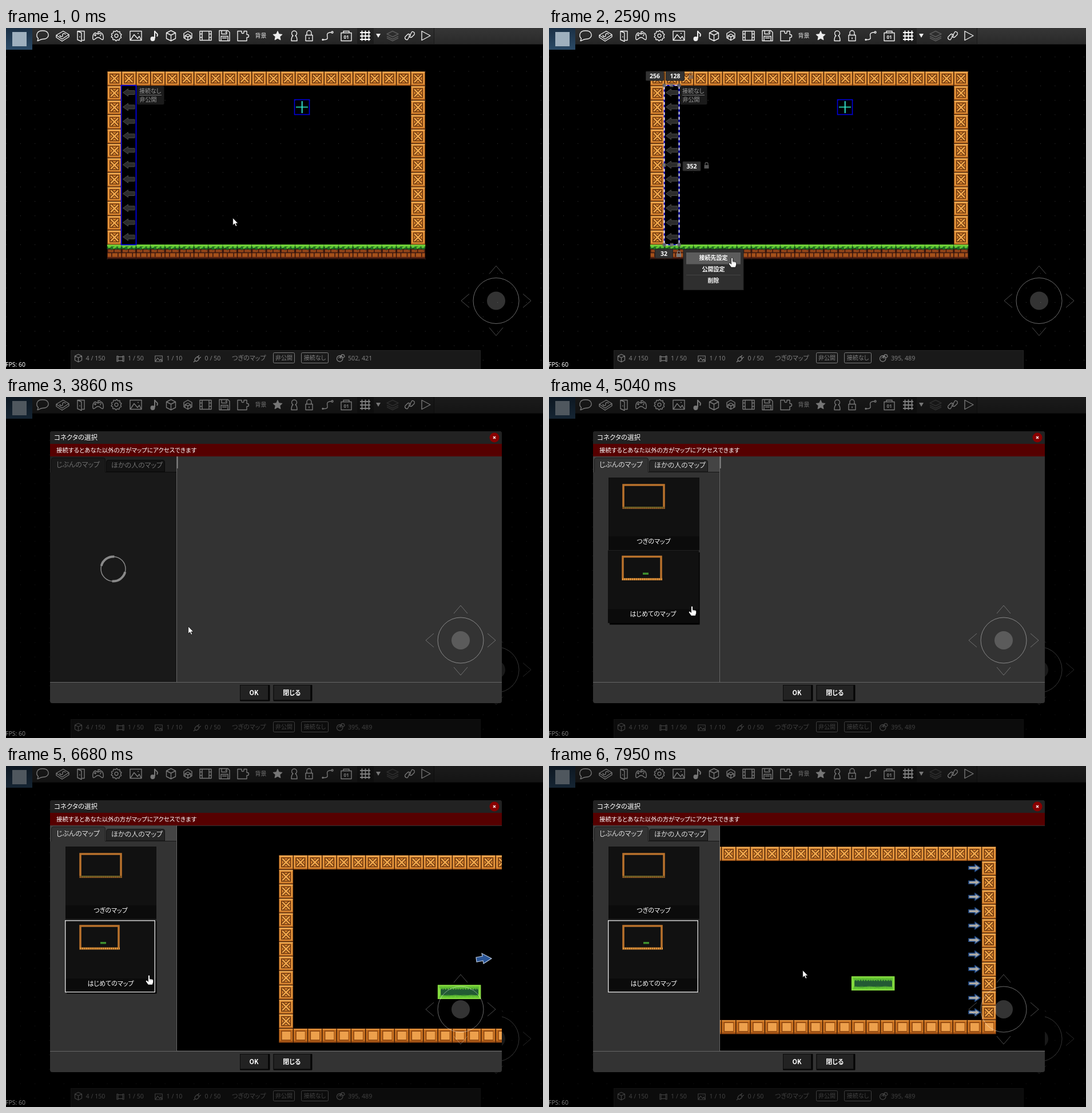
Recreate the animation shown at these times as an HTML page. Size 939 px wide and 597 px high, loop 8 s.

```html
<!DOCTYPE html>
<html lang="ja">
<head>
<meta charset="utf-8">
<title>Map editor</title>
<style>
html, body { margin: 0; width: 100%; height: 100%; overflow: hidden; background: #000; }
svg { display: block; width: 939px; height: 597px; }
text { font-family: "Noto Sans CJK JP", "Noto Sans CJK", sans-serif; font-feature-settings: "palt"; white-space: pre; }
text.n { font-family: "Noto Sans", "Open Sans", sans-serif; }
</style>
</head>
<body>
<svg id="stage" viewBox="0 0 939 597"></svg>
<script>
const U = 25.28, LOOP = 8000;

// ---- markup helpers ----
const rect = (x, y, w, h, fill, more = '') =>
  `<rect x="${x}" y="${y}" width="${w}" height="${h}" fill="${fill}" ${more}/>`;
const line = (d, color, width = 1, fill = 'none', more = '') =>
  `<path d="${d}" fill="${fill}" stroke="${color}" stroke-width="${width}" ${more}/>`;
const dot = (x, y, r, fill, more = '') => `<circle cx="${x}" cy="${y}" r="${r}" fill="${fill}" ${more}/>`;
const text = (x, y, s, size, fill, more = '') =>
  `<text x="${x}" y="${y}" font-size="${size}" fill="${fill}" ${more}>${s}</text>`;
const num = (x, y, s, size, fill, more = '') => text(x, y, s, size, fill, 'class="n" ' + more);
const group = (id, body, more = '') => `<g id="${id}" ${more}>${body}</g>`;
const at = (x, y, body, scale = 1) => `<g transform="translate(${x} ${y}) scale(${scale})">${body}</g>`;
const use = (id, x, y) => `<use href="#${id}" x="${x}" y="${y}"/>`;
const range = (n, fn) => Array.from({ length: n }, (_, i) => fn(i)).join('');
const MID = 'text-anchor="middle"', BOLD = 'font-weight="700"', SEMI = 'font-weight="500"';

const ring = (n, radius) => 'M' + Array.from({ length: n }, (_, i) => {
  const a = i / n * 2 * Math.PI - Math.PI / 2, r = radius(i);
  return (r * Math.cos(a)).toFixed(2) + ' ' + (r * Math.sin(a)).toFixed(2);
}).join('L') + 'Z';

// ---- icons, each centred on 0,0 ----
const ICON = {
  bubble: 'M-7 8.500L-9 9L-7.500 5C-10 3-11.500-1-9-5C-6-10 6-10 9-5C12 0 9 6 0 6C-3 6-4 7-7 8.500Z',
  slab: 'M-11-1L1-8L11-2L-1 6ZM-11-1V3L-1 9.500L11 2V-2M-5-1C-4 3 1 2 0-1S4-5 5-2',
  door: 'M-6-8H6V8H2M-6-8L1-5V10L-6 7ZM-2 1V3',
  pad: 'M-5-5C-10-4-10 7-8 7C-5 7-4 3 0 3S5 7 8 7C10 7 10-4 5-5C3-5 3-3 0-3S-3-5-5-5ZM-7-1H-3M-5-3V1M4-2H6M3 0H5M0-3V-7H4',
  gear: ring(40, i => i % 4 < 2 ? 9 : 7.5) + 'M3 0A3 3 0 1 1 3-.1Z',
  picture: 'M-10-8H10V8H-10ZM-9 7L-3-2L3 5L6 1L9 7M3-4H5',
  cube: 'M0-9L8-5V5L0 9L-8 5V-5ZM-8-5L0-1L8-5M0-1V9',
  cubes: 'M0-8L7-4V4L0 8L-7 4V-4ZM0-3L5 0V5M0-3L-5 0V5M-5 0L0 2L5 0M0 2V8',
  film: 'M-10-8H10V8H-10ZM-6-8V8M6-8V8M-10-3H-6M-10 3H-6M6-3H10M6 3H10',
  strip: 'M-9-7H-6V-5H6V-7H9V7H6V5H-6V7H-9ZM-6-5V5M6-5V5',
  disk: 'M-9-9H6L9-6V9H-9ZM-5-9V-3H4V-9M-6 9V1H6V9M2-7V-5M-4 4H4',
  piece: 'M-9-8H-2V-6A2 2 0 1 0 2-6V-8H7V-2H8A2.500 2.500 0 1 1 8 3H7V9H-9Z',
  person: 'M-2 0A4.500 4.500 0 1 1 2 0C4 1 5 4 5 9H-5C-5 4-4 1-2 0Z',
  lock: 'M-6-1H6V9H-6ZM-4-1V-5A4 4 0 0 1 4-5V-1M0 3V6',
  curve: 'M-8 7C10 8-10-5 7-6M-9 7A1 1 0 1 0-7 7A1 1 0 1 0-9 7M7-6A1.500 1.500 0 1 0 10-6A1.500 1.500 0 1 0 7-6',
  counter: 'M-9-5H9V9H-9ZM-5-5V-8H5V-5',
  grid: 'M-9-5.500H9M-9 .5H9M-9 6.500H9M-5.500-9V9M.5-9V9M6.500-9V9',
  layers: 'M0-8L10-3L0 2L-10-3ZM-10 1L0 6L10 1M-10 4L0 9L10 4',
  link: 'M-1 2L-4 7A3.500 3.500 0 0 1-8 2L-4-2A3 3 0 0 1 1 1M1-2L4-7A3.500 3.500 0 0 1 8-2L4 2A3 3 0 0 1-1-1',
  play: 'M-7-8L8 0L-7 8Z',
  plug: 'M-8 8L-4 4M-5 1C-3-3-1-4 1-5L5 0C4 3 2 5-1 6C-4 6-6 4-5 1ZM2-4L5-8M5-1L9-4',
  pointer: 'M-7 0A6 6 0 1 0 5 2A6 6 0 1 0-7 0M-4 0L4-4M-1-5L2 1M3-4A3 2 0 1 1 8-5A3 2 0 1 1 3-4'
};
const icon = (name, x, y, color = '#eee', scale = 1, width = 1.4) =>
  at(x, y, line(ICON[name], color, width, 'none', 'stroke-linejoin="round"'), scale);

// ---- tiles ----
const S = U / 32;
const sym = (id, body) => `<g id="${id}"><g transform="scale(${S})">${body}</g></g>`;
const CROSS = 'M8 8L24 24M24 8L8 24';
const defs = `<defs>
<linearGradient id="bar" x2="0" y2="1"><stop stop-color="#363636"/><stop offset="1" stop-color="#292929"/></linearGradient>
<linearGradient id="navy" x2="0" y2="1"><stop stop-color="#1b3045"/><stop offset="1" stop-color="#2b4a66"/></linearGradient>
<pattern id="weave" width="2" height="2" patternUnits="userSpaceOnUse">${rect(0, 0, 2, 2, '#0c0c0c')}${rect(0, 0, 1, 1, '#555')}${rect(1, 1, 1, 1, '#444')}</pattern>
<pattern id="dots" x="-.4" y="-.4" width="${U}" height="${U}" patternUnits="userSpaceOnUse">${rect(0, 0, 1, 1, '#3c3c3c')}</pattern>
<clipPath id="pane">${rect(299, 105, 568, 393, '#000')}</clipPath>
${sym('crate', rect(0, 0, 32, 32, '#4a2108') + rect(1, 1, 30, 30, '#e3933a') + rect(1, 1, 30, 2, '#f4b35c') +
  rect(1, 29, 30, 2, '#b8651d') + rect(6, 6, 20, 20, '#d9862f', 'stroke="#6a330d" stroke-width="1.800"') +
  line(CROSS, '#5a2a0a', 6.4) + line(CROSS, '#efa64c', 3.4))}
${sym('block', rect(0, 0, 32, 32, '#4a2108') + rect(1, 1, 30, 30, '#c8701f') + rect(1, 1, 30, 2, '#e99b44') +
  rect(1, 28, 30, 3, '#9a4c12') + rect(5, 5, 22, 22, '#8a430f') + rect(7, 7, 19, 18, '#eda04c'))}
${sym('soil', rect(0, 0, 32, 32, '#3a1810') + rect(2, 11, 12, 6, '#8f4218') + rect(16, 11, 14, 6, '#8f4218') +
  rect(1, 19, 8, 9, '#a5501a') + rect(11, 19, 12, 9, '#a5501a') + rect(25, 19, 6, 9, '#a5501a') +
  rect(1, 27, 30, 2, '#6a2c12') +
  line('M0 0H32V8L28 12L24 9L19 11L15 8L10 12L6 9L0 10Z', '#12401a', 1, '#1f6b22') +
  line('M2 6L8 4M13 8L20 4M24 6L30 5', '#5cc531', 4) + rect(0, 0, 32, 4, '#74d53a'))}
<g id="exit">${line('M-10 0L-1-6.500V-3.500H10.500V3.500H-1V6.500Z', '#484848', 1, 'url(#weave)')}</g>
<g id="entry">${line('M-10-2.500H1V-6L10 0L1 6V2.500H-10Z', '#244f8c', 1.6, '#a3a3a3')}${line('M-9 0H7', '#b5b0a8', 2)}</g>
</defs>`;

// ---- map scene ----
const stick = (x, y) => at(x, y,
  dot(0, 0, 40, 'none', 'stroke="#fff" stroke-opacity=".42"') + dot(0, 0, 16, '#fff', 'fill-opacity=".2"') +
  [0, 90, 180, 270].map(a => line('M-12-47L0-61L12-47', '#fff', 1, 'none', `stroke-opacity=".3" transform="rotate(${a})"`)).join(''));

const TOOLS = [['bubble', 64], ['slab', 99], ['door', 131], ['pad', 161], ['gear', 193], ['picture', 227], ['cube', 288.5],
  ['cubes', 318], ['film', 349], ['disk', 382], ['piece', 414], ['person', 504], ['lock', 530], ['curve', 562],
  ['counter', 595], ['link', 706], ['play', 734]];

const toolbar = rect(0, 0, 939, 28, 'url(#bar)') + rect(46, 0, 702, 28, '#000', 'fill-opacity=".1"') +
  rect(614, 0, 29, 28, '#000', 'fill-opacity=".25"') +
  line('M0 28.500H939M748.500 0V28', '#1a1a1a') +
  rect(0, 0, 46, 38, 'url(#navy)') + rect(11, 7, 25, 25, '#9fb0be') +
  TOOLS.map(([n, x]) => icon(n, x, 13.5)).join('') +
  icon('grid', 628, 13.5, '#fff', 1, 1.8) + icon('layers', 676, 13.5, '#5a5a5a') +
  line(ring(10, i => i % 2 ? 4 : 8.5), '#eee', 1, '#eee', 'transform="translate(475 14)"') +
  line('M260 18V5C262 10 267 9 264 15', '#eee', 2) + dot(256.5, 19, 4, '#eee') +
  num(595, 19, '01', 8, '#eee', `${MID} ${BOLD}`) +
  line('M647 10H655L651 17Z', '#eee', 0, '#eee') + text(445.5, 17, '背景', 10, '#eee', `${MID} ${SEMI}`);

const room = range(22, i => use('crate', (7 + i) * U, 3 * U) + use('soil', (7 + i) * U, 15 * U)) +
  range(11, i => use('crate', 7 * U, (4 + i) * U) + use('crate', 28 * U, (4 + i) * U));

const EDGE = [201.5, 100.5, 26, 279];
const connector = range(11, i => use('exit', 214.5, (4.47 + i) * U)) +
  rect(...EDGE, 'none', 'stroke="#00e" stroke-width="1.700"') +
  rect(229, 101, 47.5, 33, '#1b1b1b', 'rx="2"') + line('M233 117.500H272', '#777') +
  text(233, 113.5, '接続なし', 10, '#999') + text(233.5, 128.5, '非公開', 10, '#999');

const spawn = rect(504.5, 125.5, 26, 26, 'none', 'stroke="#00d" stroke-width="1.600"') +
  line('M507 138.500H528', '#22c2a0', 2) + line('M517.700 128V149', '#35dfd0', 2);

const tag = (x, y, w, s) => rect(x, y, w, 16, '#333', 'rx="1" stroke="#222"') + num(x + w / 2, y + 12, s, 10.5, '#fff', `${MID} font-weight="600"`);
const smallLock = (x, y, c) => rect(x - 4, y - 1, 8, 6, c) + line(`M${x - 2.5} ${y}v-3a2.500 2.500 0 0 1 5 0v3`, c, 1.4);
const HANDLES = [[0, 0], [.5, 0], [1, 0], [0, .5], [1, .5], [0, 1], [.5, 1], [1, 1]];
const option = (y, s) => text(287.5, y, s, 10, '#fff', `${MID} ${BOLD}`);
const selection = rect(...EDGE, 'none', 'stroke="#fff" stroke-width="1.700" stroke-dasharray="5 4"') +
  HANDLES.map(([a, b]) => rect(EDGE[0] + a * EDGE[2] - 3, EDGE[1] + b * EDGE[3] - 3, 6, 6, '#666', 'fill-opacity=".8"')).join('') +
  tag(169.5, 76, 31, 256) + tag(204.5, 76, 32, 128) + tag(234, 234, 31, 352) + tag(185.5, 387, 31, 32) +
  smallLock(248, 84, '#8b6a4c') + smallLock(275.5, 241, '#555') + smallLock(227, 396, '#777') +
  rect(235, 387.5, 105, 71, '#2f2f2f', 'stroke="#222"') + group('hot', rect(240, 393, 95, 20, '#5c5c5c')) +
  line('M240 413.500H335M240 432.500H335', '#444') +
  option(406, '接続先設定') + option(426, '公開設定') + option(446, '削除');

const GREY = '#7e7e7e';
const status = rect(113.5, 564.5, 716, 34, '#191919', 'stroke="#242424"') +
  icon('cube', 126.5, 578, GREY, .75, 1.6) + icon('strip', 200, 579, GREY, .68, 1.7) + icon('picture', 267, 579, GREY, .62, 1.8) +
  icon('plug', 334, 579, GREY, .75, 1.8) + icon('pointer', 584.5, 578, GREY, .85, 1.6) +
  [[139.5, '4 / 150'], [213, '1 / 50'], [280.5, '1 / 10'], [347.5, '0 / 50']].map(([x, s]) => num(x, 582, s, 10.7, GREY)).join('') +
  text(395, 582, 'つぎのマップ', 11, GREY) +
  rect(467.5, 568.5, 37, 18, 'none', `rx="2" stroke="${GREY}"`) + text(486, 581, '非公開', 10, GREY, MID) +
  rect(516.5, 568.5, 47, 18, 'none', `rx="2" stroke="${GREY}"`) + text(540, 581, '接続なし', 10, GREY, MID) +
  num(598, 582, '', 10.7, GREY, 'id="pos"');

const scene = rect(0, 0, 939, 597, '#000') + rect(0, 29, 939, 568, 'url(#dots)') + room + connector + spawn +
  stick(857, 477.5) + toolbar + status + group('picked', selection) + num(-1, 593, 'FPS: 60', 10.5, '#fff', SEMI);

// ---- dialog ----
const thumb = (x, y, w, h, base) => rect(x + 2, y + 2, w - 4, h - 4, '#111', 'stroke="#b9722c" stroke-width="3.500"') +
  line(`M${x} ${y + h - 2}H${x + w}`, base, 3.5) + line(`M${x} ${y + h - 2}H${x + w}`, '#5d3512', 3.5, 'none', 'stroke-dasharray=".8 2.600"');
const card = (x, y, name, pic) => rect(x, y, 159, 127, '#111') + rect(x, y + 103, 159, 24, '#0b0b0b') + pic +
  text(x + 79, y + 115.5, name, 11, '#fff', MID);

const list = card(104, 141, 'つぎのマップ', thumb(128, 152, 75, 44, '#8a5a24') + line('M131 193H200', '#4d6a2a')) +
  group('second', rect(106, 272, 157.5, 126.5, '#000', 'id="shade"') +
    group('card', card(104, 269, 'はじめてのマップ', thumb(128, 278, 71, 43.5, '#e79a3e') + rect(165, 308, 10, 3.5, '#3f8f2e'))) +
    rect(103.7, 270.7, 156.6, 125, 'none', 'id="frame" stroke="#ddd" stroke-width="1.400"'));

const tabs = rect(77, 104, 221, 28, '#444') +
  line('M175.500 131V114Q175.500 110.500 179 110.500H274Q277.500 110.500 277.500 114V131Z', '#111', 1, '#262626') +
  line('M174 131.500H298', '#161616') +
  line('M79.500 132V110Q79.500 106.500 83 106.500H170Q173.500 106.500 173.500 110V132', '#1c1c1c', 1, '#333') +
  text(88, 122.5, 'じぶんのマップ', 12, '#ddd') + text(184, 124, 'ほかの人のマップ', 12, '#ddd');

const BLADES = 60;
const tuft = range(BLADES, i => {
  const x = 3 + i * 70 / BLADES, a = 5 + 3 * Math.abs(Math.sin(i * 2.3)), b = 20 - 3 * Math.abs(Math.sin(i * 1.7));
  return line(`M${x} 2V${a}M${x} ${b}V23`, i % 2 ? '#6bcf35' : '#4fae2c', 1.3);
});
const grass = rect(0, 0, 3 * U - .8, U - 1, '#83d93f') + rect(5, 5, 66, 14, '#235a34') + tuft +
  rect(1, 1, 3 * U - 2.8, U - 3, 'none', 'stroke="#83d93f" stroke-width="2.500"');

const preview = range(21, i => use('crate', i * U, 0) + use('block', i * U, 12 * U)) +
  range(11, i => use('crate', 0, (1 + i) * U) + use('crate', 20 * U, (1 + i) * U) + use('entry', 19.5 * U, (1.48 + i) * U)) +
  at(11 * U, 9 * U, grass);
const hint = line('M822 335L833 333L832 328L849 337L835 346L834 341L823 343Z', '#b9c8dd', 1.2, '#2a5597');

const arc = a => line('M0-21.500A21.500 21.500 0 0 0-21.200-3.500', '#8a8a8a', 4, 'none', `transform="rotate(${a})"`);
const loader = (id, x, w, cx) => group(id, rect(x, 104, w, 395, '#000', 'fill-opacity=".5"') +
  `<g transform="translate(${cx} 301)"><g class="spin">${dot(0, 0, 21.5, 'none', 'stroke="#8a8a8a" stroke-width="1.500"')}${arc(5)}${arc(185)}</g></g>`);

const button = (x, w, s) => rect(x, 504, w + 1.5, 28.5, '#050505', 'rx="1"') +
  rect(x + .5, 504.5, w - 2, 26, '#222', 'stroke="#0c0c0c"') + text(x + w / 2 - 1, 521.5, s, 11, '#fff', `${MID} ${BOLD}`);

const dialog = rect(0, 0, 939, 597, '#000', 'fill-opacity=".5"') +
  rect(77, 60, 790, 476, '#333', 'rx="4"') + rect(77, 60, 790, 30, '#222', 'rx="4"') + rect(77, 82, 790, 22, '#560000') +
  text(84, 75, 'コネクタの選択', 11.5, '#fff', SEMI) + text(88, 96.5, '接続するとあなた以外の方がマップにアクセスできます', 10.5, '#fff') +
  dot(854, 71, 8.5, '#800') + line('M852 69L856 73M856 69L852 73', '#fff', 1.4) +
  tabs + group('list', list) +
  `<g id="view" clip-path="url(#pane)">${rect(299, 105, 568, 394, '#000')}${group('world', preview)}${group('hint', hint)}</g>` +
  stick(795, 426) + loader('wait1', 77, 221.5, 187.5) + loader('wait2', 299, 568, 583.5) +
  line('M298.500 104V499M77 499.500H867', '#666') + rect(299, 104, 1.5, 21, '#888', 'id="notch"') +
  button(409, 51, 'OK') + button(467.5, 66.5, '閉じる');

const cursors = group('arrow', at(-.3, -.5, line('M0 0V14L3.200 11L5.500 16L7.800 15L5.500 10.300H9.800Z', '#000', .8, '#fff'), .92)) +
  group('hand', at(1, 0, line('M-1.500 1Q0-1 1.500 1V7L6 7.500Q8 8 8 10V13L6.500 18H-1.500L-6 11.500Q-5.500 9-3.500 10L-1.500 12Z', '#000', .8, '#fff') +
    line('M1.500 7V10M4 7.500V10M6 8V10', '#888', .7), .95));

document.getElementById('stage').innerHTML = defs + scene + group('dialog', dialog) + cursors;

// ---- motion ----
const $ = id => document.getElementById(id);
const show = (id, on) => $(id).setAttribute('display', on ? 'inline' : 'none');
const move = (id, x, y) => $(id).setAttribute('transform', `translate(${x.toFixed(2)} ${y.toFixed(2)})`);
const spins = document.querySelectorAll('.spin');

// start, end, steps, from, control, to
const MOVES = [
  [340, 1050, 9, [397, 333], [300, 312], [211, 327]],
  [1800, 2590, 10, [211, 327], [311, 378], [319, 402]],
  [4680, 5040, 5, [319, 402], [285, 384], [249, 366]],
  [6960, 7050, 2, [249, 366], [420, 372], [562, 375]],
  [7320, 7400, 2, [562, 375], [620, 377], [670, 373]],
  [7680, 7950, 4, [670, 373], [557, 365], [444, 358]]
];
function progress(t, t0, t1, n) {
  if (t < t0) return 0;
  const k = Math.min(n, Math.floor((t - t0 + .5) / (t1 - t0) * (n - 1)) + 1);
  return k / n;
}
function cursorAt(t) {
  const m = MOVES.filter(v => t >= v[0]).pop() || MOVES[0];
  const p = progress(t, m[0], m[1], m[2]), u = p * p * (3 - 2 * p);
  return [0, 1].map(i => (1 - u) ** 2 * m[3][i] + 2 * u * (1 - u) * m[4][i] + u * u * m[5][i]);
}

function draw(t) {
  const [x, y] = cursorAt(t);
  const open = t >= 3860, picked = t >= 6150, loaded = t >= 6680, menu = t >= 1240 && !open;
  const overItem = menu && x > 240 && x < 335 && y >= 393;
  const overCard = t >= 4130 && x > 104 && x < 262 && y > 269 && y < 397;
  const hand = overItem || overCard;

  show('picked', menu);
  show('hot', overItem);
  $('hot').setAttribute('opacity', t >= 3670 ? .55 : 1);
  const inMenu = open || (menu && y >= 387);
  $('pos').textContent = inMenu ? '395, 489' : `${Math.floor(x / S)}, ${Math.floor(y / S)}`;

  show('dialog', open);
  show('list', t >= 4130);
  show('wait1', t < 4130);
  show('wait2', picked && !loaded);
  show('notch', !loaded);
  show('view', loaded);
  show('shade', overCard);
  show('frame', picked);
  const lifted = overCard && !picked;
  move('card', lifted ? -1 : 0, lifted ? -.5 : 0);

  const drag = t >= 7680 ? [x - 670, y - 373] : [0, 0];
  move('world', 477 + drag[0], 156 + drag[1]);
  show('hint', drag[0] > -93);

  const angle = Math.floor((t - (picked ? 6150 : 3860) + .5) / 89) * 32;
  spins.forEach(s => s.setAttribute('transform', `rotate(${angle})`));

  show('arrow', !hand);
  show('hand', hand);
  move(hand ? 'hand' : 'arrow', x, y);
}

const start = performance.now();
function tick() {
  draw((performance.now() - start) % LOOP);
  requestAnimationFrame(tick);
}
tick();
</script>
</body>
</html>
```
